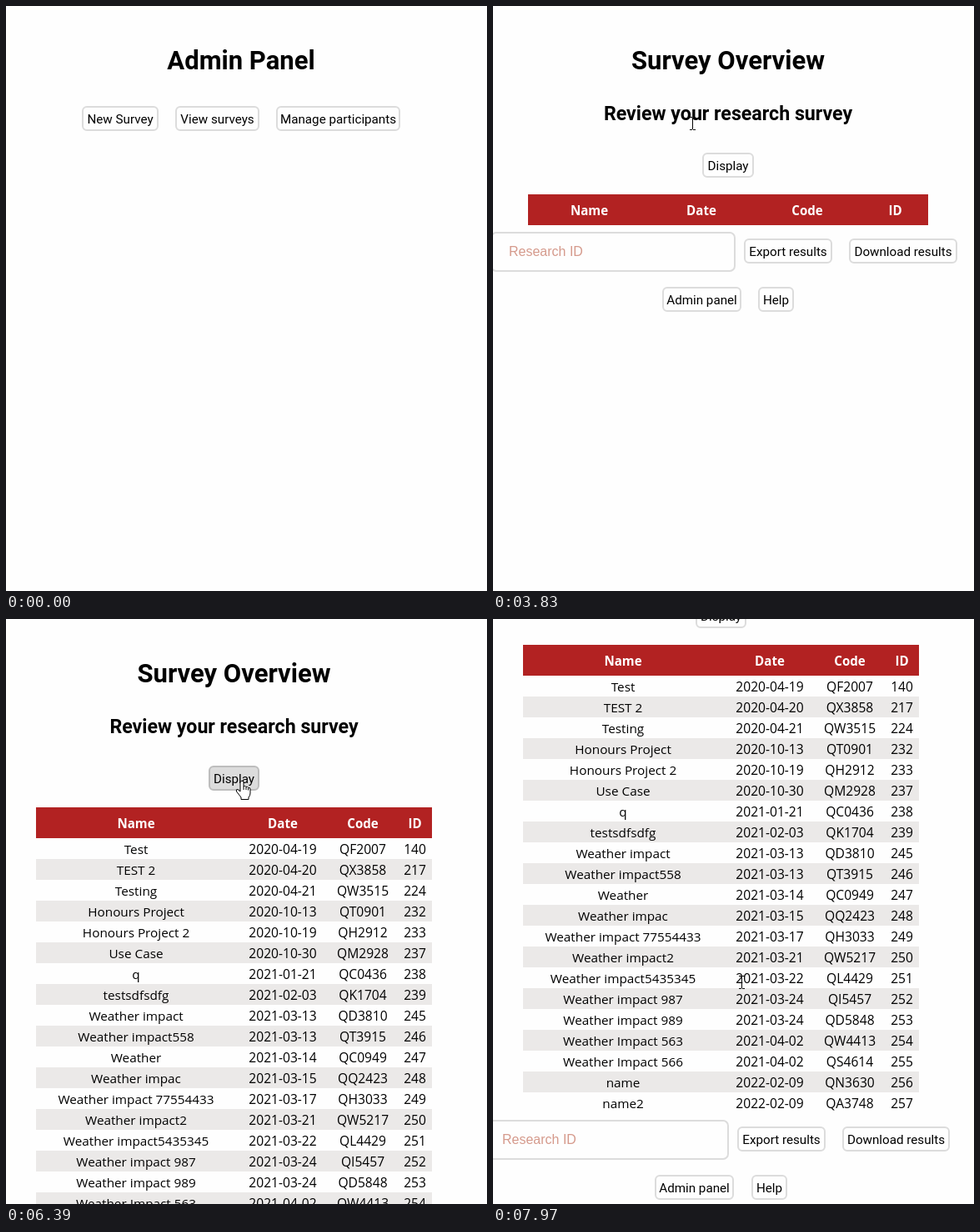
Recreate the animation shown at these times as an HTML page with a canvas. Size 577 by 702 pixels, loop 8000 ms.

```html
<!DOCTYPE html>
<html lang="en">
<head>
<meta charset="utf-8">
<title>Survey admin</title>
<style>
  html, body { margin: 0; width: 100%; height: 100%; overflow: hidden; background: #fefefe; }
  canvas { display: block; width: 577px; height: 702px; }
</style>
</head>
<body>
<canvas id="stage" width="577" height="702"></canvas>
<script>
const ctx = document.getElementById('stage').getContext('2d');
const LOOP = 8000, STEP = 65.8;
const UI = 'Roboto, sans-serif', CELL = '"Open Sans", sans-serif';
const ROW = 25, TABLE_TOP = 226, HEAD_H = 37, INPUT_TOP = 271;

const rows = `Test|2020-04-19|QF2007|140
TEST 2|2020-04-20|QX3858|217
Testing|2020-04-21|QW3515|224
Honours Project|2020-10-13|QT0901|232
Honours Project 2|2020-10-19|QH2912|233
Use Case|2020-10-30|QM2928|237
q|2021-01-21|QC0436|238
testsdfsdfg|2021-02-03|QK1704|239
Weather impact|2021-03-13|QD3810|245
Weather impact558|2021-03-13|QT3915|246
Weather|2021-03-14|QC0949|247
Weather impac|2021-03-15|QQ2423|248
Weather impact 77554433|2021-03-17|QH3033|249
Weather impact2|2021-03-21|QW5217|250
Weather impact5435345|2021-03-22|QL4429|251
Weather impact 987|2021-03-24|QI5457|252
Weather impact 989|2021-03-24|QD5848|253
Weather Impact 563|2021-04-02|QW4413|254
Weather Impact 566|2021-04-02|QS4614|255
name|2022-02-09|QN3630|256
name2|2022-02-09|QA3748|257`.split('\n').map(line => line.split('|'));

// time, x, y of the pointer's hot spot
const path = [
  [130, 519, 684], [400, 420, 500], [700, 230, 245], [925, 163, 159],
  [1130, 151, 142], [1270, 152, 141], [1480, 215, 140], [1650, 239, 139],
  [3780, 239, 139], [4100, 240, 156], [4400, 246, 203], [4620, 249, 224],
  [4813, 285, 276], [5050, 297, 305], [5480, 311, 333],
  [5760, 314, 299], [6000, 296, 246], [6260, 283, 194],
  [6930, 283, 194], [7200, 292, 285], [7580, 302, 442],
  [7780, 302, 442], [7972, 298, 436]
];
const clicks = [[1640, 1710], [6320, 6385]];

function pointer(t) {
  if (t < path[0][0]) return null;
  for (let i = 1; i < path.length; i++) {
    const [t0, x0, y0] = path[i - 1], [t1, x1, y1] = path[i];
    if (t <= t1) {
      const k = (t - t0) / (t1 - t0);
      return { x: Math.round(x0 + (x1 - x0) * k), y: Math.round(y0 + (y1 - y0) * k) };
    }
  }
  const [, x, y] = path[path.length - 1];
  return { x, y };
}

const progress = (t, from, to) => Math.min(1, Math.max(0, (t - from) / (to - from)));

// Two turns of the wheel: a steady one, then one that slows down.
function scrollAt(t) {
  const second = 1 - (1 - progress(t, 7780, 7970)) ** 2;
  return Math.round(137 * progress(t, 7645, 7770) + 58 * second);
}

function text(str, x, y, font, color = '#000', align = 'center') {
  ctx.font = font;
  ctx.fillStyle = color;
  ctx.textAlign = align;
  ctx.fillText(str, x, y);
}

function box(x, y, w, h, radius, border, fill) {
  ctx.beginPath();
  ctx.roundRect(x + 1, y + 1, w - 2, h - 2, radius);
  ctx.fillStyle = fill;
  ctx.fill();
  ctx.lineWidth = 2;
  ctx.strokeStyle = border;
  ctx.stroke();
}

const over = (p, x, y, w, h) => p && p.x >= x && p.x < x + w && p.y >= y && p.y < y + h;

// Draws a button and tells whether the pointer is on it.
function button(label, x, y, w, p) {
  const hot = over(p, x, y, w, 30);
  box(x, y, w, 30, 5, hot ? '#bdbdbd' : '#dcdcdc', hot ? '#dcdcdc' : '#fefefe');
  text(label, x + w / 2, y + 21, `15.2px ${UI}`);
  return hot;
}

const heading = (str, x, y, size) => text(str, x, y, `bold ${size}px ${UI}`);

function adminPage(p) {
  heading('Admin Panel', 282, 76, 31);
  return [
    button('New Survey', 91, 120, 92, p),
    button('View surveys', 203, 120, 101, p),
    button('Manage participants', 324, 120, 149, p)
  ].some(Boolean);
}

function table(x, w, centers, data) {
  ctx.fillStyle = '#b22222';
  ctx.fillRect(x, TABLE_TOP, w, HEAD_H);
  ['Name', 'Date', 'Code', 'ID'].forEach((name, c) =>
    text(name, centers[c], 251, `bold 15.1px ${CELL}`, '#fff'));
  data.forEach((row, i) => {
    if (i % 2) {
      ctx.fillStyle = '#ebe9e8';
      ctx.fillRect(x, TABLE_TOP + HEAD_H + ROW * i, w, ROW);
    }
    row.forEach((value, c) =>
      text(value, centers[c], 282 + ROW * i, `${c ? 15.6 : 15.3}px ${CELL}`));
  });
}

function surveyPage(p, filled, scroll) {
  const dx = filled ? -8 : 0, dy = filled ? ROW * rows.length : 0;
  const mid = filled ? 273.5 : 282;
  const q = p && { x: p.x, y: p.y + scroll };
  ctx.save();
  ctx.translate(0, -scroll);
  heading('Survey Overview', mid, 76, 31);
  heading('Review your research survey', mid, 137, 23.2);
  if (filled) table(36, 475, [156, 332, 428, 490.5], rows);
  else table(42, 480, [115.5, 250, 377, 482.5], []);
  box(dx - 3, INPUT_TOP + dy, 294, 48, 6, '#dcdcdc', '#fefefe');
  text('Research ID', 19 + dx, 300 + dy, '16px "Liberation Sans", Arial, sans-serif', '#d59a8c', 'left');
  const hot = [
    button('Display', 251 + dx, 176, filled ? 61 : 62, q),
    button('Export results', 301 + dx, 279 + dy, 106, q),
    button('Download results', 427 + dx, 279 + dy, filled ? 129 : 130, q),
    button('Admin panel', 203 + dx - (filled ? 1 : 0), 337 + dy, 95, q),
    button('Help', 318 + dx, 337 + dy, 43, q)
  ].some(Boolean);
  ctx.restore();
  return hot;
}

function outline(d) {
  const shape = new Path2D(d);
  ctx.fillStyle = '#fff';
  ctx.fill(shape);
  ctx.lineWidth = 1;
  ctx.lineJoin = 'round';
  ctx.strokeStyle = '#000';
  ctx.stroke(shape);
}

const cursors = {
  arrow() {
    outline('M.5 .5V16.5L4.2 13L6.6 18.5L9 17.5L6.7 12H11.5Z');
  },
  hand() {
    outline('M-2 1.5Q0 -1.5 2 1.5V7Q3.6 5.6 5 7.5Q6.6 6.4 7.6 8.4Q9.5 7.6 10 10V15Q10 18 8 20V22.5H-1V20L-6.5 13Q-7.5 10 -5 10.5L-2 13Z');
    ctx.stroke(new Path2D('M2 7V11M5 8V11M7.6 9V11.5'));
  },
  beam() {
    ctx.fillStyle = '#000';
    ctx.fillRect(0, -7, 1, 14);
    for (const y of [-8, 7]) {
      ctx.fillRect(-3, y, 3, 1);
      ctx.fillRect(1, y, 3, 1);
    }
  }
};

function onText(p, page) {
  if (page === 1) return over(p, 134, 115, 297, 34) || over(p, 0, INPUT_TOP, 291, 48);
  return page === 2 && p.y > 264;
}

function draw(t) {
  const page = t < 1905 ? 0 : t < 6385 ? 1 : 2;
  const p = pointer(t);
  ctx.fillStyle = '#fefefe';
  ctx.fillRect(0, 0, 577, 702);
  const hot = page ? surveyPage(p, page === 2, scrollAt(t)) : adminPage(p);
  if (!p) return;
  if (clicks.some(([from, to]) => t >= from && t < to)) {
    ctx.fillStyle = 'rgba(255,245,0,.55)';
    ctx.beginPath();
    ctx.arc(p.x - 2, p.y - 1, 12, 0, 7);
    ctx.fill();
  }
  ctx.save();
  ctx.translate(p.x, p.y);
  cursors[hot ? 'hand' : onText(p, page) ? 'beam' : 'arrow']();
  ctx.restore();
}

// The screen refreshes about fifteen times a second.
function tick() {
  const t = performance.now() % LOOP;
  const k = Math.floor((t + 5) / STEP);
  draw(k < 2 ? 0 : k * STEP + 10);
  requestAnimationFrame(tick);
}
tick();
</script>
</body>
</html>
```
